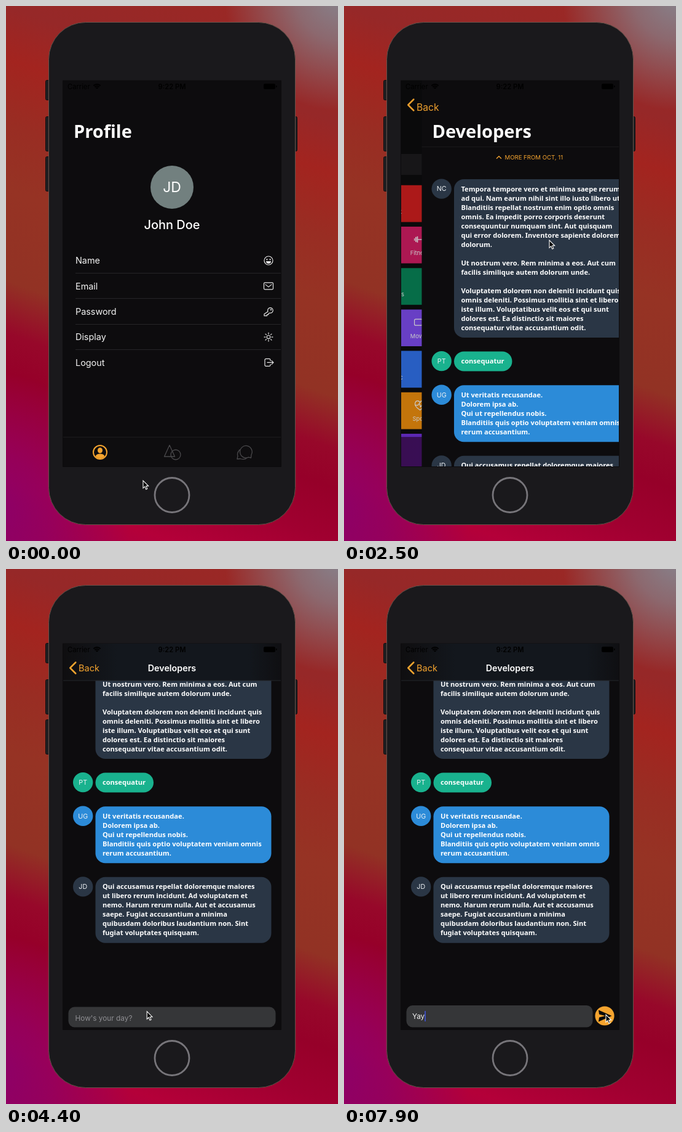
Recreate the animation shown at these times as an HTML page with a canvas. Size 540 by 868 pixels, loop 8000 ms.

```html
<!DOCTYPE html>
<html lang="en">
<head>
<meta charset="utf-8">
<title>Phone app demo</title>
<style>
html, body { margin: 0; width: 100%; height: 100%; overflow: hidden; background: #1b1a1d; }
canvas { display: block; width: 540px; height: 868px; }
</style>
</head>
<body>
<canvas id="stage"></canvas>
<script>
const canvas = document.getElementById('stage');
const c = canvas.getContext('2d');
const dpr = window.devicePixelRatio || 1;
canvas.width = 540 * dpr;
canvas.height = 868 * dpr;

const LOOP = 8000;
const SCREEN = { x: 93, y: 121, w: 354, h: 626 };
const UI = 'Inter, Roboto, sans-serif';
const ROUND = '"Noto Sans", "Open Sans", sans-serif';
const BG = '#0d0c0e', ORANGE = '#f5a42f', SLATE = '#2a3645', GREEN = '#19b28e', BLUE = '#2c8bd8';

const T = { tab: 600, push: 2200, scroll: 2800, focus: 4750, keys: [5850, 6100, 6350] };

const clamp = v => Math.max(0, Math.min(1, v));
const lerp = (a, b, p) => a + (b - a) * p;
const smooth = p => p * p * (3 - 2 * p);
const span = (t, a, b) => clamp((t - a) / (b - a));

function box(x, y, w, h, r, fill, stroke, lw = 1) {
  c.beginPath();
  c.roundRect(x, y, w, h, r);
  if (fill) { c.fillStyle = fill; c.fill(); }
  if (stroke) { c.strokeStyle = stroke; c.lineWidth = lw; c.stroke(); }
}

function disc(x, y, r, fill, stroke, lw = 1) {
  c.beginPath();
  c.arc(x, y, r, 0, Math.PI * 2);
  if (fill) { c.fillStyle = fill; c.fill(); }
  if (stroke) { c.strokeStyle = stroke; c.lineWidth = lw; c.stroke(); }
}

function gradient(x0, y0, x1, y1, stops) {
  const g = c.createLinearGradient(x0, y0, x1, y1);
  stops.forEach(s => g.addColorStop(...s));
  return g;
}

// y is the middle of the capitals
function text(str, x, y, size, color, align = 'left', weight = 400, family = UI) {
  c.font = `${weight} ${size}px ${family}`;
  c.textAlign = align;
  c.fillStyle = color;
  c.fillText(str, x, y + size * 0.36);
}

const title = (str, x, y) => text(str, x, y, 29, '#fff', 'left', 800, ROUND);

// line: stroked outline, fill: solid parts; both centred on 0,0
const ICONS = {
  smile: { line: 'M7 0A7 7 0 1 1-7 0A7 7 0 1 1 7 0', fill: 'M-4 1H4A4 4 0 0 1-4 1ZM-3.6-2.8h2v2h-2zM1.6-2.8h2v2h-2z' },
  mail: { line: 'M-6-5.5H6Q7.5-5.5 7.5-4V4Q7.5 5.5 6 5.5H-6Q-7.5 5.5-7.5 4V-4Q-7.5-5.5-6-5.5M-5-2.5L0 1.5L5-2.5' },
  key: { line: 'M-1 0A4.3 4.3 0 1 1 2 2.4L0 3V5H-2.5V7H-7V4Z', fill: 'M3-4h2v2h-2z' },
  sun: { line: 'M2.8 0A2.8 2.8 0 1 1-2.8 0A2.8 2.8 0 1 1 2.8 0M0-7V-5M0 5V7M-7 0H-5M5 0H7M-5-5L-3.6-3.6M5 5L3.6 3.6M-5 5L-3.6 3.6M5-5L3.6-3.6' },
  exit: { line: 'M3-3V-4Q3-6 1-6H-4Q-6-6-6-4V4Q-6 6-4 6H1Q3 6 3 4V3M-2 0H8M5-3L8 0L5 3' },
  user: { line: 'M11 0A11 11 0 1 1-11 0A11 11 0 1 1 11 0', fill: 'M4-3A4 4.5 0 1 1-4-3A4 4.5 0 1 1 4-3M-7.5 6.5Q-6 2.5 0 2.5Q6 2.5 7.5 6.5Q4 10 0 10Q-4 10-7.5 6.5' },
  shapes: { line: 'M-4-11.5L4.5 7H-12.5ZM14 4A8 8 0 1 1-2 4A8 8 0 1 1 14 4' },
  talk: { line: 'M10.5 9L11 4A9.8 9.8 0 1 0 6.5 8.2ZM-8-4Q-13 2-11 6L-12 11L-7 10.5Q0 13 4 9' },
  cook: { line: 'M-9 1Q-9-4-3.5-4T2 1ZM-9 4H2M-8 8H1Q2 8 2 6H-9Q-9 8-8 8M0-5H9L8 8H4M4-5L5-9H8' },
  cash: { line: 'M-9-7H9V4H-9ZM-8 6.5H8M-6 8.5H6M3-1.5A3 3 0 1 1-3-1.5A3 3 0 1 1 3-1.5M-9-4Q-6-4-6-7M9-4Q6-4 6-7M-9 1Q-6 1-6 4M9 1Q6 1 6 4' },
  gym: { line: 'M-9-1.5V1.5M9-1.5V1.5M-4 0H4', fill: 'M-7.5-4h1.7v8h-1.7zM-5-5h1.7v10h-1.7zM5.8-4h1.7v8h-1.7zM3.3-5h1.7v10h-1.7z' },
  code: { line: 'M-5-4L-9 0L-5 4M5-4L9 0L5 4', fill: 'M-4-1h2v2h-2zM-1-1h2v2h-2zM2-1h2v2h-2z' },
  pad: { line: 'M-5-6Q-2-5 0-5T5-6Q9-5 9 4Q8 8 4 3H-4Q-8 8-9 4Q-9-5-5-6M-6-1H-2M-4-3V1M3-2H4.5M5 0H6.5' },
  cup: { line: 'M5-5H8V0H5', fill: 'M-7-6H5V2Q5 4 3 4H-5Q-7 4-7 2ZM-8 6H7V7.5H-8Z' },
  bulb: { line: 'M-3 4Q-3 2-5 0A5.8 5.8 0 1 1 5 0Q3 2 3 4ZM-2.5 6.5H2.5M-1.5 9H1.5M0 3V-2L-2-4M0-2L2-4' },
  film: { line: 'M-7-5H2Q4-5 4-3V3Q4 5 2 5H-7Q-9 5-9 3V-3Q-9-5-7-5M4-1L9-4V4L4 1' },
  note: { line: 'M-3 6V-6L7-9V4M-3-3L7-6M-3 6A2.2 2 0 1 1-7 6A2.2 2 0 1 1-3 6M7 4A2.2 2 0 1 1 3 4A2.2 2 0 1 1 7 4' },
  leaf: { line: 'M-8-7Q-2-3 4-3Q8 0 8 7Q-1 8-5 4Q-8 1-8-7M-4-2Q1 1 10 8' },
  planet: { line: 'M6 0A6 6 0 1 1-6 0A6 6 0 1 1 6 0M-5-3Q-10-7-9-4Q-5 3 6 6Q10 7 8 4L5.5 1.5' },
  heart: { line: 'M0 8Q-9 2-8-3Q-7-7-4-7Q-1-7 0-4Q1-7 4-7Q7-7 8-3Q9 2 0 8M-8 0H-3L-1-3L1 3L3 0H8' }
};
for (const k in ICONS) for (const part in ICONS[k]) ICONS[k][part] = new Path2D(ICONS[k][part]);

function icon(name, x, y, color, lw = 1.2) {
  const { line, fill } = ICONS[name];
  c.save();
  c.translate(x, y);
  c.lineJoin = c.lineCap = 'round';
  c.lineWidth = lw;
  c.strokeStyle = c.fillStyle = color;
  if (line) c.stroke(line);
  if (fill) c.fill(fill);
  c.restore();
}

// column: 0 left half, 1 right half, 2 wide, 3 big on the right
const TILES = [
  ['Cook', 'cook', 2, 0, '#d9201f'], ['Developers', 'code', 3, 0, '#5f6575'],
  ['Finances', 'cash', 0, 1, '#12b07c'], ['Fitness', 'gym', 1, 1, '#d91e68'],
  ['Games', 'pad', 2, 2, '#078a5b'], ['General', 'cup', 3, 2, '#d91d68'],
  ['Ideas', 'bulb', 0, 3, '#2354e6'], ['Movies', 'film', 1, 3, '#8350f8'],
  ['Music', 'note', 2, 4, '#3376f5'], ['Nature', 'leaf', 3, 4, '#058a5b'],
  ['Space', 'planet', 0, 5, '#1c242f'], ['Sport', 'heart', 1, 5, '#f6930e'],
  ['', '', 2, 6, '#7433e0'], ['', '', 3, 6, '#3376f5']
];

const CHAT = [
  ['NC', SLATE, 281, 286, `Tempora tempore vero et minima saepe rerum
ad qui. Nam earum nihil sint illo iusto libero ut
Blanditiis repellat nostrum enim optio omnis
omnis. Ea impedit porro corporis deserunt
consequuntur numquam sint. Aut quisquam
qui error dolorem. Inventore sapiente dolorem
dolorum.

Ut nostrum vero. Rem minima a eos. Aut cum
facilis similique autem dolorum unde.

Voluptatem dolorem non deleniti incidunt quis
omnis deleniti. Possimus mollitia sint et libero
iste illum. Voluptatibus velit eos et qui sunt
dolores est. Ea distinctio sit maiores
consequatur vitae accusantium odit.`],
  ['PT', GREEN, 560.5, 94.5, 'consequatur'],
  ['UG', BLUE, 615.2, 286, `Ut veritatis recusandae.
Dolorem ipsa ab.
Qui ut repellendus nobis.
Blanditiis quis optio voluptatem veniam omnis
rerum accusantium.`],
  ['JD', SLATE, 729.8, 286, `Qui accusamus repellat doloremque maiores
ut libero rerum incidunt. Ad voluptatem et
nemo. Harum rerum nulla. Aut et accusamus
saepe. Fugiat accusantium a minima
quibusdam doloribus laudantium non. Sint
fugiat voluptates quisquam.`]
];

function backdrop() {
  // stripes lean down to the right
  const nx = -0.332, ny = 0.943, a = -180, b = 820;
  const stops = [[-180, '#9c2824'], [0, '#962828'], [80, '#a3241f'], [180, '#992d23'], [280, '#963324'], [420, '#923224'],
    [500, '#97082a'], [560, '#960029'], [640, '#a00030'], [730, '#b40039'], [820, '#a50048']];
  c.fillStyle = gradient(nx * a, ny * a, nx * b, ny * b, stops.map(([s, col]) => [(s - a) / (b - a), col]));
  c.fillRect(0, 0, 540, 868);
  glow(-20, 820, 225, '140,0,104');
  glow(545, -20, 190, '134,132,142');
}

function glow(x, y, r, rgb) {
  const g = c.createRadialGradient(x, y, 0, x, y, r);
  g.addColorStop(0, `rgba(${rgb},1)`);
  g.addColorStop(0.4, `rgba(${rgb},.7)`);
  g.addColorStop(1, `rgba(${rgb},0)`);
  c.fillStyle = g;
  c.fillRect(0, 0, 540, 868);
}

function phone() {
  for (const [x, y, w, h] of [[64.5, 120.5, 8, 32], [64.5, 179.5, 8, 56], [64.5, 244.5, 8, 56], [466, 179.5, 7.5, 56]])
    box(x, y, w, h, 2, '#201f22', '#0f0e10');
  box(69.5, 26.5, 401, 815, 60, '#1a191c', '#67524a');
  disc(270, 793.5, 28, null, '#77757a', 2.8);
  box(92.5, 121, 355, 626.5, 0, null, '#0c0b0d');
}

function tabBar(active) {
  c.fillStyle = active
    ? gradient(93, 0, 447, 0, [[0, '#26113a'], [0.12, '#481265'], [0.42, '#48126b'], [0.54, '#0c3263'], [0.62, '#063c78'], [0.88, '#073a70'], [1, '#0b2038']])
    : '#0e0d0f';
  c.fillRect(93, 699.5, 354, 48);
  c.fillStyle = active ? 'rgba(0,0,0,.25)' : '#1c1b1d';
  c.fillRect(93, 699, 354, 1);
  const off = active ? '#665a62' : '#4a494c';
  icon('user', 153, 724, active ? off : ORANGE, active ? 1.3 : 2);
  icon('shapes', 270, 724, active ? ORANGE : off, active ? 2 : 1.3);
  icon('talk', 388, 724, off, 1.3);
}

function profile() {
  title('Profile', 110, 204);
  disc(270, 294, 35, '#72807f');
  text('JD', 270, 294, 23, '#fff', 'center');
  text('John Doe', 270, 354.5, 20, '#fff', 'center', 500);
  [['Name', 'smile'], ['Email', 'mail'], ['Password', 'key'], ['Display', 'sun'], ['Logout', 'exit']].forEach(([name, pic], i) => {
    const y = 413 + i * 41.35;
    text(name, 113, y, 14.4, '#f4f4f4');
    icon(pic, 427, y, '#e6e6e6');
    if (i < 4) {
      c.fillStyle = '#262528';
      c.fillRect(113, Math.round(y + 20), 334, 1);
    }
  });
  tabBar(0);
}

function explore(fade) {
  c.globalAlpha = fade;
  title('Welcome, John!', 109, 204);
  c.globalAlpha = 1;
  box(105.5, 240, 329.5, 34, 9, '#1d1c1e');
  disc(119, 256, 6.7, null, '#8b8a8e', 1.4);
  c.beginPath();
  c.moveTo(124, 261);
  c.lineTo(129, 266);
  c.stroke();
  text('Search', 133, 257.5, 14.6, '#87868a');
  for (const [name, pic, col, row, color] of TILES) {
    const x = [110.5, 192.5, 110.5, 274.2][col], w = [73.7, 73.7, 155.7, 155][col];
    const y = 290.8 + row * 67.2, h = col === 3 ? 126.8 : 59.6;
    box(x, y, w, h, 4, color);
    if (!name) continue;
    icon(pic, x + w / 2, y + h / 2 - 9, '#fff');
    text(name, x + w / 2, y + h / 2 + 13, 9.3, '#fff', 'center');
  }
  tabBar(1);
}

function chat(scroll) {
  c.save();
  c.translate(0, -scroll);
  title('Developers', 110, 204);
  c.fillStyle = '#1a191b';
  c.fillRect(93, 228, 354, 1);
  chevron(218.5, 245.5, 3.6, 0, 1.3);
  text('MORE FROM OCT, 11', 228, 245.5, 9.6, ORANGE);
  for (const [who, color, y, w, body] of CHAT) {
    const lines = body.split('\n');
    disc(125.2, y + 15.6, 16.2, color);
    text(who, 125.2, y + 15.6, 10.7, '#eef2f5', 'center');
    box(145.5, y, w, lines.length * 15 + 17, 16, color);
    lines.forEach((s, i) => text(s, 157, y + 15.7 + i * 15, 11.1, '#fff', 'left', 700, ROUND));
  }
  c.restore();
}

// turn 0 points up, 1 points left
function chevron(x, y, r, turn, lw) {
  c.save();
  c.translate(x, y);
  c.rotate(-turn * Math.PI / 2);
  c.beginPath();
  c.moveTo(-r, r / 2);
  c.lineTo(0, -r / 2);
  c.lineTo(r, r / 2);
  c.lineWidth = lw;
  c.lineCap = c.lineJoin = 'round';
  c.strokeStyle = ORANGE;
  c.stroke();
  c.restore();
}

function navBar(left, scroll) {
  c.globalAlpha = clamp((scroll - 10) / 40);
  // the bubbles shimmer through the middle of the bar
  c.fillStyle = gradient(93, 0, 447, 0, [[0, '#0f0e10'], [0.25, '#13171d'], [0.85, '#13171d'], [1, '#0f0f12']]);
  c.fillRect(93, 121, 354, 60);
  c.fillStyle = '#25272b';
  c.fillRect(93, 180.5, 354, 1);
  text('Developers', 270, 160.5, 14.3, '#fff', 'center', 600);
  c.globalAlpha = clamp(1.15 - left * 2);
  chevron(108.8, 160.5, 9, 1, 2.5);
  text('Back', 118, 160.5 + left * 40, 14.5 + left * 13, ORANGE);
  c.globalAlpha = 1;
}

function statusBar() {
  text('Carrier', 100, 131, 11.2, '#000');
  text('9:22 PM', 270, 131, 11.2, '#000', 'center', 600);
  c.strokeStyle = '#000';
  c.lineWidth = 2;
  for (const r of [2, 5, 8]) {
    c.beginPath();
    c.arc(148, 135, r, -Math.PI * 0.75, -Math.PI * 0.25);
    c.stroke();
  }
  box(419, 126, 19, 9, 2.5, '#000');
  c.fillRect(439, 129, 1.5, 3);
}

function inputBar(t) {
  const typed = 'Yay'.slice(0, T.keys.filter(k => t >= k).length);
  const focused = t >= T.focus;
  const sending = span(t, T.keys[0], T.keys[0] + 200);
  const top = focused ? 708 : 710.5;
  c.globalAlpha = span(t, T.scroll - 100, T.scroll + 150);
  c.fillStyle = BG;
  c.fillRect(93, 703, 354, 44);
  box(101.5, top, lerp(337, 303, smooth(sending)), 743.5 - top, 10, '#353638');
  const y = focused ? 726 : 728.5;
  if (typed) text(typed, 111, y, 11.8, '#f2f2f2');
  else text("How's your day?", 112.5, y, 11.8, '#8e8e92');
  if (focused) {
    const last = [T.focus, ...T.keys].filter(k => t >= k).pop();
    if ((t - last) % 1000 < 600) {
      c.fillStyle = '#4055d8';
      c.fillRect(111 + c.measureText(typed).width, 717, 1.6, 17);
    }
  }
  if (sending > 0) {
    c.globalAlpha = sending;
    disc(424, 725, 15.6, ORANGE);
    c.beginPath();
    [[414, 715.5], [435.5, 725], [414, 734.5], [415, 727.5], [425, 725], [415, 722.5]].forEach(p => c.lineTo(...p));
    c.fillStyle = '#0b0a0b';
    c.fill();
  }
  c.globalAlpha = 1;
}

const PATH = [
  [0, 223, 770], [450, 268, 728], [700, 268, 728], [1100, 279, 536], [1700, 334, 380],
  [2650, 334, 380], [3500, 245, 653], [3900, 245, 653], [4500, 228, 723], [6900, 228, 723], [7700, 426, 723], [8000, 426, 723]
];

function pointer(t) {
  const i = PATH.findIndex(k => k[0] > t);
  const [t0, x0, y0] = PATH[i - 1], [t1, x1, y1] = PATH[i];
  const p = smooth(span(t, t0, t1));
  c.save();
  c.translate(lerp(x0, x1, p), lerp(y0, y1, p));
  c.beginPath();
  [[0, 0], [0, 12.3], [2.8, 9.7], [4.8, 14.2], [6.8, 13.3], [4.9, 8.9], [8.7, 8.8]].forEach(q => c.lineTo(...q));
  c.closePath();
  c.lineJoin = 'miter';
  c.lineWidth = 1.1;
  c.fillStyle = '#000';
  c.strokeStyle = '#fff';
  c.fill();
  c.stroke();
  c.restore();
}

function fillScreen(color) {
  c.fillStyle = color;
  c.fillRect(SCREEN.x, SCREEN.y, SCREEN.w, SCREEN.h);
}

function screen(t) {
  c.save();
  c.beginPath();
  c.rect(SCREEN.x, SCREEN.y, SCREEN.w, SCREEN.h);
  c.clip();
  fillScreen(BG);
  if (t < T.tab) profile();
  else {
    // share of the push still to travel, as a damped spring
    const w = Math.max(0, t - T.push) * 0.0132;
    const left = t > T.push + 700 ? 0 : (1 + w) * Math.exp(-w);
    if (left > 0) {
      c.save();
      c.translate(-SCREEN.w * 0.33 * (1 - left), 0);
      explore(clamp(1 - (1 - left) * 1.4));
      c.restore();
      fillScreen(`rgba(0,0,0,${0.23 * (1 - left)})`);
    }
    if (t >= T.push) {
      const scroll = 230 * smooth(span(t, T.scroll, T.scroll + 400));
      c.save();
      c.translate(SCREEN.w * left, 0);
      fillScreen(BG);
      chat(scroll);
      c.restore();
      navBar(left, scroll);
      if (t >= T.scroll - 100) inputBar(t);
    }
  }
  statusBar();
  c.restore();
}

function draw(now) {
  const t = now % LOOP;
  c.setTransform(dpr, 0, 0, dpr, 0, 0);
  backdrop();
  phone();
  screen(t);
  pointer(t);
}

let start = null;
function tick(now) {
  if (start === null) start = now;
  draw(now - start);
  requestAnimationFrame(tick);
}
draw(0);
requestAnimationFrame(tick);
</script>
</body>
</html>
```
